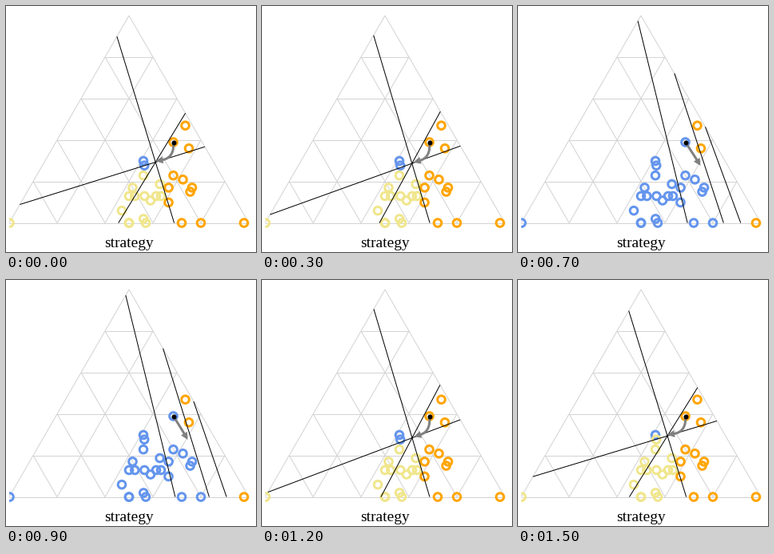
Write a matplotlib script that moves like this. It is 313 px wide and 308 px high and loops after 1.6 s.

```python
import numpy as np
import matplotlib.pyplot as plt
from matplotlib.animation import FuncAnimation
from matplotlib.patches import Rectangle

W, H, DPI = 313, 308, 100
FRAMES, INTERVAL = 16, 100
PX = 72 / DPI

TOP, BASE, MID, HALF = 12.0, 271.6, 154.0, 150.0
SLOPE = HALF / (BASE - TOP)
BLUE, KHAKI, ORANGE = "cornflowerblue", "khaki", "orange"

# Sample points, grouped by height.
ROWS = {
    149.7: [224.5], 178.3: [229], 170.5: [209.5], 194: [172], 199.7: [173.2],
    212.2: [172, 209.5], 217.3: [221.5], 223: [192.6], 227.4: [158.5, 203.6, 233],
    232.6: [230.6], 238: [154, 161.3, 173.4, 188, 194], 243.5: [181],
    246: [203.5], 256.2: [145], 266.5: [172.2],
    BASE: [4.5, 154, 154, 175, 220, 244, 298],
}
POINTS = [(x, y) for y, xs in ROWS.items() for x in xs]
FOCUS = np.array([209.5, 170.5])


def ease(lo, hi, u, power=1):
    return lo + (hi - lo) * u ** power


def edge(y, side):
    """Point on the left (-1) or right (+1) side of the triangle."""
    return np.array([MID + side * SLOPE * (y - TOP), y])


def foot(x):
    return np.array([x, BASE])


def meet(a, b, c, d):
    """Crossing of the lines a-b and c-d."""
    s, _ = np.linalg.solve(np.column_stack([b - a, c - d]), c - a)
    return a + s * (b - a)


def right_of(p, a, b):
    """True when p lies to the right of the way from a to b, y pointing down."""
    return (b[0] - a[0]) * (p[1] - a[1]) - (b[1] - a[1]) * (p[0] - a[0]) > 0


def progress(i):
    """A sharp swell at half time on top of a slow, lagging drift."""
    phase = 2 * np.pi / FRAMES
    swell = (1 - np.cos(phase * i)) / 2
    drift = 1 + np.cos(phase * (i - 4.8))
    return 0.96 * swell ** 3.6 + 0.03 * drift


def boundaries(u):
    """Three lines through one common point, each from its foot upwards."""
    left = foot(210.8 - 11.8 * u + 15.1 * u ** 2), edge(ease(39, 16.5, u, 0.85), -1)
    mid = foot(ease(138, 273, u)), edge(ease(135, 77, u, 1.1), 1)
    end = edge(ease(176.6, 147.5, u, 1.15), 1)
    hub = meet(*left, *mid)
    start = meet(hub, end, foot(0), foot(W))
    if start[0] < MID - HALF:
        start = meet(hub, end, edge(TOP, -1), edge(BASE, -1))
    return left, mid, (start, end)


def colour(p, left, mid, right):
    if right_of(p, *right) and not right_of(p, *left):
        return KHAKI
    return ORANGE if right_of(p, *mid) else BLUE


def arrow(u):
    tip = np.array([ease(186.5, 234, u), ease(200, 193.6, 1 - u, 6)])
    bend = np.array([ease(211, 220, u), ease(190, 184, u)])
    d = (tip - bend) / np.hypot(*(tip - bend))
    n = np.array([-d[1], d[0]])
    t = np.linspace(0, 1, 30)[:, None]
    path = (1 - t) ** 2 * FOCUS + 2 * t * (1 - t) * bend + t ** 2 * (tip - 8 * d)
    back = tip - 9 * d
    return path, [tip, back + 4.5 * n, back - 4.5 * n]


fig = plt.figure(figsize=(W / DPI, H / DPI), dpi=DPI, facecolor="white")
ax = fig.add_axes([0, 0, 1, 1])
ax.set_xlim(0, W)
ax.set_ylim(H, 0)
ax.axis("off")


def segment(a, b, **style):
    return ax.plot(*zip(a, b), solid_capstyle="butt", lw=PX, **style)[0]


for k in range(5):
    x = MID - HALF + 2 * HALF * k / 5
    y = TOP + (BASE - TOP) * k / 5
    below = y + (BASE - TOP) / 5
    for a, b in [(edge(below, -1), edge(below, 1)),
                 (foot(x), edge(y, 1)),
                 (foot(2 * MID - x), edge(y, -1))]:
        segment(a, b, color="lightgray", zorder=1)

rings = ax.scatter(*zip(*POINTS), s=(9.6 * PX) ** 2, facecolors="none",
                   linewidths=3 * PX, zorder=2)
lines = [segment((0, 0), (0, 0), color="black", zorder=3) for _ in range(3)]
shaft, = ax.plot([], [], color="gray", lw=3 * PX, solid_capstyle="butt", zorder=4)
head, = ax.fill([0, 0, 0], [0, 0, 0], color="gray", lw=0, zorder=4)
ax.plot(*FOCUS, "o", color="black", ms=6 * PX, mew=0, zorder=5)
ax.add_patch(Rectangle((0, 0), MID - HALF, H, color="white", lw=0, zorder=6))
ax.text(MID, 302, "strategy", family="Liberation Serif", fontsize=19.4 * PX,
        color="black", ha="center", va="baseline")


def draw(i):
    u = progress(i)
    bounds = boundaries(u)
    for line, ends in zip(lines, bounds):
        line.set_data(*zip(*ends))
    rings.set_edgecolors([colour(p, *bounds) for p in POINTS])
    path, triangle = arrow(u)
    shaft.set_data(*path.T)
    head.set_xy(triangle)
    return [rings, shaft, head, *lines]


anim = FuncAnimation(fig, draw, frames=FRAMES, interval=INTERVAL,
                     repeat=True, repeat_delay=0, blit=False)
plt.show()
```
